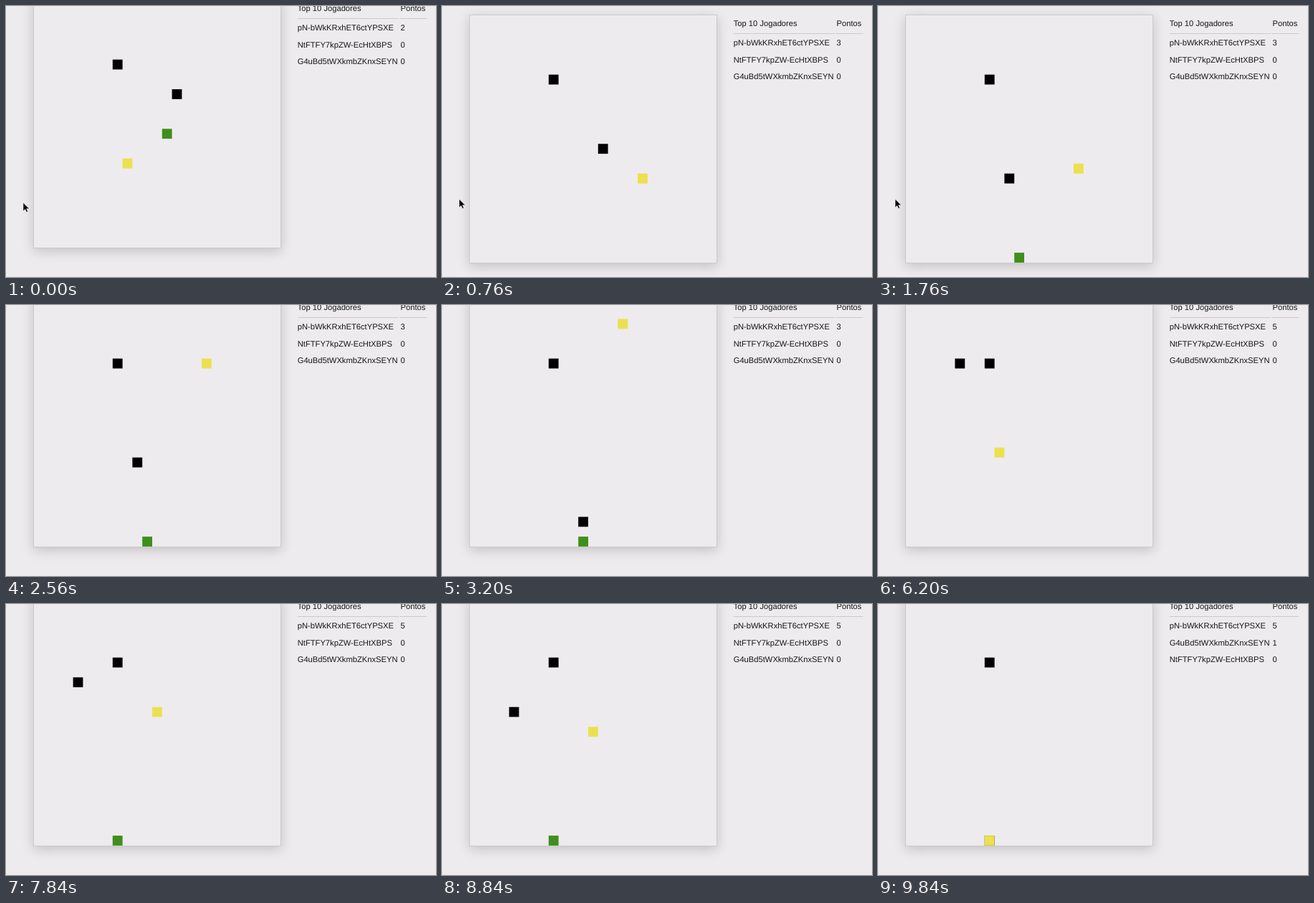
An HTML page that plays this animation: 600x378 px, repeating every 10000 ms.

```html
<!DOCTYPE html>
<html lang="pt">
<head>
<meta charset="utf-8">
<title>Jogo</title>
<style>
html, body { margin: 0; width: 100%; height: 100%; overflow: hidden; background: #edebed; }
#page { position: absolute; left: 0; top: 0; width: 600px; height: 400px; }
#board { position: absolute; left: 38px; top: 12px; width: 346px; height: 347px; box-sizing: border-box;
  border: 1px solid #cccacc; background: #edebed; box-shadow: 0 4px 16px rgba(0, 0, 0, .18); }
svg { position: absolute; left: 0; top: 0; }
text { font: 11.2px "Liberation Sans", Arial, sans-serif; fill: #161618; text-rendering: geometricPrecision; }
</style>
</head>
<body>
<div id="page">
  <div id="board"></div>
  <svg width="600" height="400">
    <path d="M407 38.5H548M549.5 38.5H587.5" stroke="#cbcacc"/>
    <text x="406.7" y="28.2">Top 10 Jogadores</text>
    <text x="550.5" y="28.2">Pontos</text>
    <g id="scores"></g>
    <rect id="fruit" width="13.8" height="13.8" fill="#3f8f1a"/>
    <rect id="idle" width="13.8" height="13.8"/>
    <rect id="rival" width="13.8" height="13.8"/>
    <rect id="me" width="13.8" height="13.8" fill="#ece04f"/>
  </svg>
</div>
<svg width="600" height="378">
  <path id="mouse" d="M0 0V11.5L2.7 9L4.6 13L6.4 12.2L4.6 8.3H8.3Z" stroke="#fff" stroke-width=".5"/>
</svg>
<script>
const LOOP = 10000, TICK = 40, STEP = 60, CELL = 13.8;
const $ = id => document.getElementById(id);

// Stops of each player: arrival time, column, row
const rival = [[0, 14, 9], [320, 13, 13], [1640, 10, 16], [3200, 11, 22], [3320, 11, 24],
  [5320, 10, 7], [6200, 5, 6], [7400, 4, 8], [9840, 8, 24]];
const me = [[0, 9, 16], [720, 17, 16], [1040, 17, 15], [2920, 15, 2], [5320, 8, 23],
  [6200, 9, 15], [6900, 12, 11], [8200, 12, 12], [9720, 8, 24]];
// Fruit: appears, eaten, column, row
const fruits = [[0, 320, 13, 13], [1200, 3320, 11, 24], [4720, 5320, 10, 7], [7200, 9720, 8, 24]];
const A = "pN-bWkKRxhET6ctYPSXE", B = "NtFTFY7kpZW-EcHtXBPS", C = "G4uBd5tWXkmbZKnxSEYN";

const ease = (t, from, to) => {
  const k = Math.min(1, Math.max(0, (t - from) / (to - from)));
  return k * k * (3 - 2 * k);
};
const toward = (a, b, n) => a + Math.sign(b - a) * Math.min(n, Math.abs(b - a));

// Wait, then walk cell by cell, rows first, to arrive on time
function walk(stops, t) {
  const i = stops.findIndex(s => s[0] > t);
  if (i < 0) return stops[stops.length - 1].slice(1);
  const [t0, x0, y0] = stops[i - 1], [t1, x1, y1] = stops[i];
  const rows = Math.abs(y1 - y0), cells = rows + Math.abs(x1 - x0);
  const time = Math.min(t1 - t0, cells * STEP);
  const done = Math.max(0, Math.floor(cells * (1 - (t1 - t) / time)));
  return [toward(x0, x1, Math.max(0, done - rows)), toward(y0, y1, done)];
}

function place(id, [col, row]) {
  $(id).setAttribute("x", 38.4 + col * CELL);
  $(id).setAttribute("y", 12.9 + row * CELL);
}

let shown = "";
function showScores(t) {
  const eaten = fruits.filter(f => t >= f[1]).length;
  const rows = [[A, 2 + Math.min(eaten, 3)], ...(eaten < 4 ? [[B, 0], [C, 0]] : [[C, 1], [B, 0]])];
  const html = rows.map(([name, points], i) => {
    const y = 55.2 + i * 23.4;
    return `<text x="406.7" y="${y}">${name}</text><text x="550.5" y="${y}">${points}</text>`;
  }).join("");
  if (html !== shown) $("scores").innerHTML = shown = html;
}

function draw(now) {
  const t = Math.floor(now % LOOP / TICK) * TICK;
  const down = ease(t, 120, 320);
  const scroll = Math.round(21 * (1 - down + ease(t, 2100, 2300)));
  $("page").style.transform = `translateY(${-scroll}px)`;
  place("idle", [8, 6]);
  place("rival", walk(rival, t));
  place("me", walk(me, t));
  const fruit = fruits.find(f => t >= f[0] && t < f[1]);
  $("fruit").style.display = fruit ? "" : "none";
  if (fruit) place("fruit", fruit.slice(2));
  showScores(t);
  $("mouse").style.display = t < 2300 ? "" : "none";
  $("mouse").setAttribute("transform", `translate(24 ${274.5 - 5 * down})`);
  requestAnimationFrame(draw);
}
draw(0);
</script>
</body>
</html>
```
